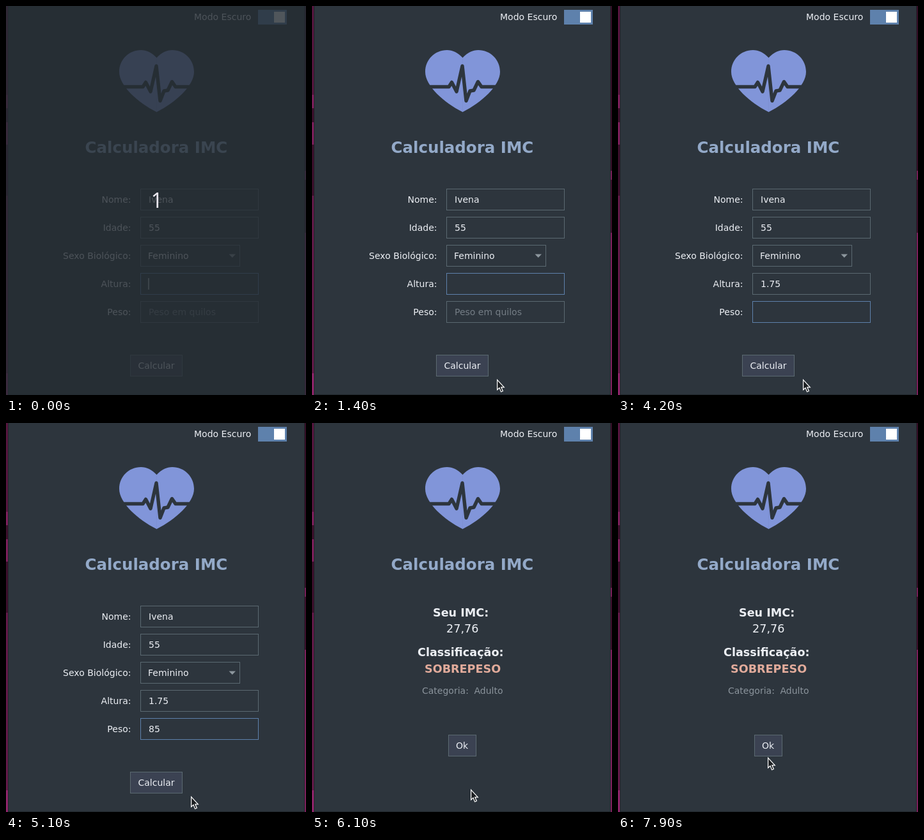
These frames come from a looping animation (469 by 609 pixels, 8000 ms). An HTML page with a canvas:

```html
<!DOCTYPE html>
<html lang="pt">
<head>
<meta charset="utf-8">
<title>Calculadora IMC</title>
<style>
html, body { margin: 0; width: 100%; height: 100%; overflow: hidden; background: #2d353d; }
canvas { display: block; width: 469px; height: 609px; }
</style>
</head>
<body>
<canvas id="stage"></canvas>
<script>
const W = 469, H = 609, LOOP = 8000, STEP = 100, BLINK = 490;
const FOCUS_WEIGHT = 3710, HOVER = 5400, RESULT = 6100;
const BG = '#2d353d', TEXT = '#eceff4', BORDER = '#5b6971', ACCENT = '#5e81ac', BUTTON = '#3b4252';
const FONT = '"DejaVu Sans", sans-serif';

const canvas = document.getElementById('stage');
const ctx = canvas.getContext('2d');
const dpr = window.devicePixelRatio || 1;
canvas.width = W * dpr;
canvas.height = H * dpr;

const keys = [
  { t: 1490, char: '1' }, { t: 2210, char: '.' }, { t: 2990, char: '7' }, { t: 3190, char: '5' },
  { t: 4390, char: '8' }, { t: 4600, char: '5' }
];
const glides = [
  { start: 800, end: 1000, to: [290, 585] },
  { start: 5200, end: 5500, to: [249, 574] },
  { start: 7500, end: 7600, to: [241, 579] },
  { start: 7700, end: 7900, to: [235, 524] }
];
const pointerEntry = [302, 580];

const typed = (t, from, to) =>
  keys.filter(k => k.t >= from && k.t < to && k.t <= t).map(k => k.char).join('');

// The caret restarts its blink at every key press and focus change.
function caretOn(t) {
  const resets = [-90, FOCUS_WEIGHT, ...keys.map(k => k.t)].filter(r => r <= t);
  return (t - Math.max(...resets)) % (2 * BLINK) < BLINK;
}

function pointerAt(t) {
  if (t < glides[0].start) return null;
  return glides.reduce((pos, { start, end, to }) => {
    const p = Math.min(1, Math.max(0, (t - start) / (end - start)));
    const eased = 1 - (1 - p) ** 1.6;
    return pos.map((v, i) => v + (to[i] - v) * eased);
  }, pointerEntry);
}

function rect(x, y, w, h, fill) {
  ctx.fillStyle = fill;
  ctx.fillRect(x, y, w, h);
}

function box(x, y, w, h, line = BORDER, fill = BG) {
  rect(x, y, w, h, line);
  rect(x + 1, y + 1, w - 2, h - 2, fill);
}

function polygon(points) {
  ctx.beginPath();
  points.forEach(([x, y]) => ctx.lineTo(x, y));
}

function text(str, x, y, { size = 14, color = TEXT, bold = false, align = 'left' } = {}) {
  ctx.font = `${bold ? 'bold ' : ''}${size}px ${FONT}`;
  ctx.fillStyle = color;
  ctx.textAlign = align;
  ctx.fillText(str, x, y);
}

// Wallpaper beside the window: each band runs from its y to the bottom.
function wallpaper(x, bands) {
  for (const [y, light] of bands) {
    rect(x, y, 4, H - y, `rgb(${130 * light}, ${34 * light}, ${96 * light})`);
  }
}

function drawWindow() {
  wallpaper(0, [[0, 0.65], [139, 0.95], [160, 0.45], [182, 0.95], [217, 0.45], [297, 0.75], [575, 1.1]]);
  wallpaper(466, [[0, 0.4], [258, 0.9], [272, 0.45], [355, 0.95]]);
  rect(3, 0, 464, H, '#20262c');
  rect(4, 0, 462, H - 1, BG);
}

function drawHeart() {
  ctx.fillStyle = '#8195d9';
  for (const side of [-1, 1]) {
    const x = d => 235.5 + side * d;
    ctx.beginPath();
    ctx.moveTo(x(-0.3), 81);
    ctx.lineTo(x(0), 81);
    ctx.bezierCurveTo(x(7.5), 73, x(15.5), 69, x(24.5), 69);
    ctx.bezierCurveTo(x(43.5), 69, x(58.5), 84, x(58.5), 103);
    ctx.bezierCurveTo(x(58.5), 125, x(29.5), 151, x(0), 166);
    ctx.lineTo(x(-0.3), 166);
    ctx.fill();
  }
  polygon([[176, 126.5], [214, 126.5], [218.5, 119.5], [226, 134], [235, 94], [241, 148.5],
    [247, 133], [253, 132], [259.5, 118.5], [265, 126.5], [296, 126.5]]);
  ctx.strokeStyle = BG;
  ctx.lineWidth = 5.5;
  ctx.lineJoin = 'round';
  ctx.stroke();
}

function drawHeader() {
  text('Modo Escuro', 294, 22);
  rect(394, 6, 45, 23, ACCENT);
  rect(419, 9, 17, 17, '#ffffff');
  drawHeart();
  text('Calculadora IMC', 123.5, 230, { size: 24.5, bold: true, color: '#93a9c8' });
}

function drawLabel(label, y) {
  text(label, 195.5, y + 22, { align: 'right' });
}

function drawField(label, y, value, focused, showCaret) {
  drawLabel(label, y);
  box(210, y, 185, 34, focused ? ACCENT : BORDER);
  text(value, 223, y + 22);
  if (focused && showCaret) {
    rect(Math.round(222 + ctx.measureText(value).width), y + 8, 2, 18, '#99a0a7');
  }
}

function drawSelect(label, y, value) {
  drawLabel(label, y);
  box(210, y, 156, 34);
  text(value, 222, y + 22);
  polygon([[348.5, y + 14.5], [359, y + 14.5], [353.75, y + 20]]);
  ctx.fillStyle = '#8d979e';
  ctx.fill();
}

function drawForm(t) {
  const onWeight = t >= FOCUS_WEIGHT;
  const showCaret = caretOn(t);
  const hover = t >= HOVER;
  drawField('Nome:', 286, 'Ivena');
  drawField('Idade:', 330, '55');
  drawSelect('Sexo Biológico:', 374, 'Feminino');
  drawField('Altura:', 418, typed(t, 0, FOCUS_WEIGHT), !onWeight, showCaret);
  drawField('Peso:', 462, typed(t, FOCUS_WEIGHT, LOOP), onWeight, showCaret);
  if (!onWeight) text('Peso em quilos', 223, 484, { color: '#747d85' });
  box(194, 546, 82, 34, BORDER, hover ? '#4c566a' : BUTTON);
  text('Calcular', 206.5, 568, { color: hover ? '#d8dee9' : TEXT });
}

function drawResult() {
  const size = 17.6, gray = { color: '#8b949c' };
  text('Seu IMC:', 189, 303, { size, bold: true });
  text('27,76', 210, 328, { size });
  text('Classificação:', 165, 365, { size, bold: true });
  text('SOBREPESO', 176, 391, { size, bold: true, color: '#e2ab9b' });
  text('Categoria:', 172, 424, gray);
  text('Adulto', 253.5, 424, gray);
  box(213, 488, 44, 34, BORDER, BUTTON);
  text('Ok', 225, 510);
}

function drawPointer(pos) {
  if (!pos) return;
  const arrow = [[0, 0], [0, 15.5], [3.4, 12.5], [6, 18.7], [8.8, 17.5], [6.2, 11.5], [10.7, 11.5]];
  polygon(arrow.map(([x, y]) => [pos[0] - 0.4 + x, pos[1] + 0.3 + y]));
  ctx.closePath();
  ctx.fillStyle = '#1c1f22';
  ctx.fill();
  ctx.strokeStyle = '#ffffff';
  ctx.lineWidth = 1.2;
  ctx.lineJoin = 'miter';
  ctx.stroke();
}

function drawCountdown() {
  rect(0, 0, W, H, 'rgba(37, 44, 50, 0.8)');
  ctx.font = '32px "Noto Sans", sans-serif';
  ctx.fillStyle = '#e9e6ee';
  ctx.textAlign = 'center';
  ctx.fillText('1', 236, 316);
}

function draw(t) {
  ctx.setTransform(dpr, 0, 0, dpr, 0, 0);
  drawWindow();
  drawHeader();
  if (t < RESULT) drawForm(t);
  else drawResult();
  drawPointer(pointerAt(t));
  if (t < STEP) drawCountdown();
}

// The picture advances in whole steps, like a screen capture.
const begin = performance.now();
function tick() {
  const t = (performance.now() - begin) % LOOP;
  draw(Math.floor(t / STEP) * STEP);
  requestAnimationFrame(tick);
}
tick();
</script>
</body>
</html>
```
